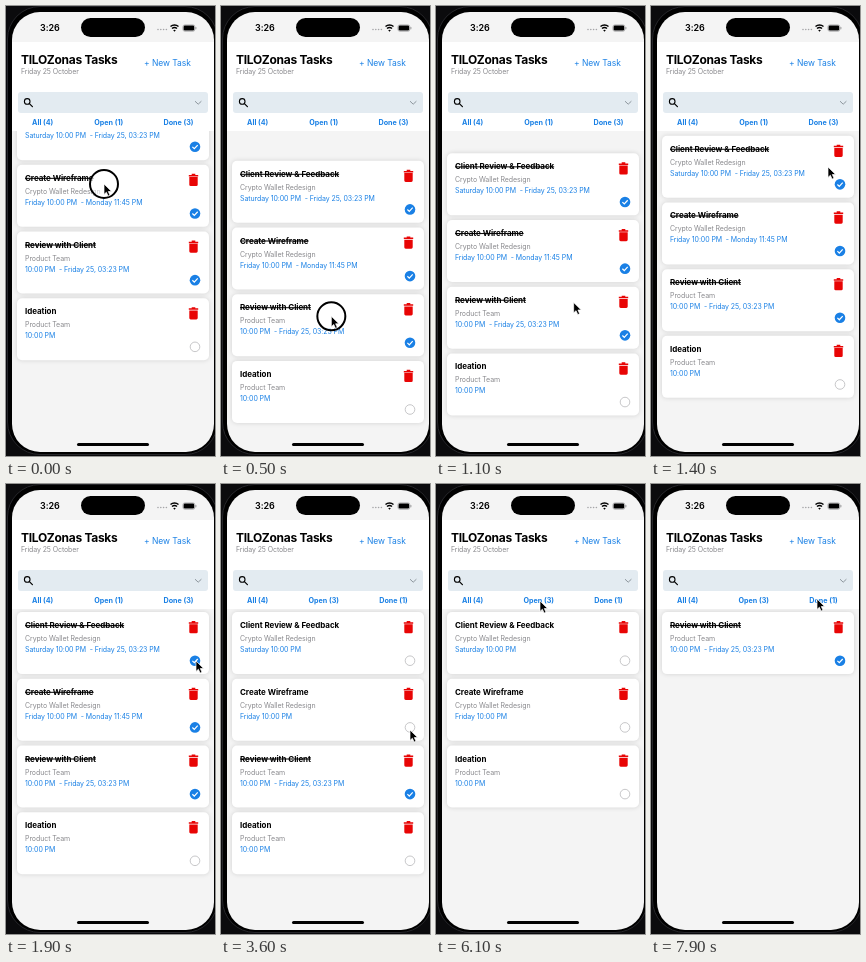
Write an HTML page that moves like this. It is 209 px wide and 450 px high and loops after 8 s.

```html
<!DOCTYPE html>
<html lang="en">
<head>
<meta charset="utf-8">
<title>Tasks</title>
<style>
  html, body { margin: 0; width: 100%; height: 100%; overflow: hidden; background: #0b0b0d; }
  #stage { position: relative; width: 209px; height: 450px; overflow: hidden; font-family: Inter, Roboto, sans-serif; }
  #stage div, #stage svg { position: absolute; }
  .body { left: 1px; top: 0; width: 211px; height: 449px; box-sizing: border-box; border: 1px solid #26262a; border-radius: 33px; background: #000; }
  .screen { left: 6px; top: 6px; width: 202px; height: 440px; border-radius: 28px; background: #f4f4f4; overflow: hidden; }
  .header { left: 6px; top: 36px; width: 202px; height: 89px; background: #fff; }
  .island { left: 75px; top: 12px; width: 64px; height: 19px; border-radius: 10px; background: #000; }
  .home { left: 71px; top: 437px; width: 72px; height: 2.5px; border-radius: 2px; background: #000; }
  .search { left: 12px; top: 86px; width: 190px; height: 21px; border-radius: 3px; background: #e3ebf1; }
  .text { height: 20px; line-height: 20px; white-space: pre; }
  .clock { left: 34px; top: 12px; font-size: 9px; font-weight: 600; letter-spacing: -.1px; }
  .name { left: 15px; top: 44px; font-size: 12px; font-weight: 700; letter-spacing: -.3px; }
  .day { left: 15px; top: 56px; font-size: 7px; letter-spacing: -.1px; color: #8a8a8e; }
  .new { left: 138px; top: 47px; font-size: 8.5px; letter-spacing: -.05px; color: #1a80e5; }
  .tab { top: 107px; width: 60px; text-align: center; font-size: 7.2px; font-weight: 700; color: #1a80e5; }
  #list { left: 6px; top: 125px; width: 202px; height: 302px; overflow: hidden; }
  .card { left: 5px; top: 0; width: 192px; height: 62px; border-radius: 5px; background: #fff; box-shadow: 0 0 5px rgba(0, 0, 0, .14); }
  .card .text { left: 8px; font-size: 7px; }
  .card .title { top: 3px; font-size: 8px; font-weight: 700; letter-spacing: -.05px; }
  .card .project { top: 17px; letter-spacing: -.08px; color: #8a8a8e; }
  .card .when { top: 28.4px; letter-spacing: -.08px; color: #1a80e5; }
  .done .title { text-decoration: line-through; text-decoration-thickness: 1px; }
  .card svg { left: 0; top: 0; }
  .tick, .card .end { display: none; }
  .done .tick, .done .end { display: inline; }
  .done .ring { display: none; }
  #pointer { left: 0; top: 0; overflow: visible; }
</style>
</head>
<body>
<div id="stage">
  <div class="body"></div>
  <div class="screen"></div>
  <div class="header"></div>
  <div class="island"></div>
  <div class="text clock">3:26</div>
  <div class="text name">TILOZonas Tasks</div>
  <div class="text day">Friday 25 October</div>
  <div class="text new">+ New Task</div>
  <div class="search"></div>
  <div class="text tab" style="left:6.7px"></div>
  <div class="text tab" style="left:72.7px"></div>
  <div class="text tab" style="left:142.5px"></div>
  <svg width="209" height="120" fill="none">
    <path d="M152 23.5h9" stroke="#a5a5a8" stroke-width="1.6" stroke-linecap="round" stroke-dasharray="0 2.8"/>
    <path d="M164.5 20.6a5.8 5.8 0 0 1 8 0M166 22.6a3.6 3.6 0 0 1 5 0" stroke="#000" stroke-width="1.4"/>
    <path d="M167.2 24.2a2 2 0 0 1 2.6 0l-1.3 1.6z" fill="#000"/>
    <rect x="176.9" y="18.9" width="12" height="6.4" rx="2" stroke="#9b9b9d" stroke-width=".7"/>
    <rect x="177.6" y="19.6" width="10.6" height="5" rx="1.4" fill="#000"/>
    <path d="M189.9 21v2.2" stroke="#9b9b9d"/>
    <circle cx="21.2" cy="95.4" r="2.8" stroke="#000" stroke-width="1.1"/>
    <path d="M23.4 97.6l3 3" stroke="#000" stroke-width="1.2" stroke-linecap="round"/>
    <path d="M189 95.2l3.2 3 3.2-3" stroke="#8d969d" stroke-width="1"/>
  </svg>
  <div id="list"></div>
  <div class="home"></div>
  <svg id="pointer" width="20" height="20">
    <circle r="14" fill="#fff" fill-opacity=".6" stroke="#000" stroke-width="2"/>
    <path d="M0 0v10.4l2.4-2.2 1.7 3.9 1.9-.8-1.7-3.8h3.3z" fill="#000" stroke="#fff" stroke-width=".7"/>
  </svg>
</div>
<script>
  const LOOP = 8000, PITCH = 66.7, TOP = 3.1, RELEASE = 900;

  // until: when the task stops being done
  const tasks = [
    { title: 'Client Review & Feedback', project: 'Crypto Wallet Redesign', start: 'Saturday 10:00 PM', end: 'Friday 25, 03:23 PM', until: 2400 },
    { title: 'Create Wireframe', project: 'Crypto Wallet Redesign', start: 'Friday 10:00 PM', end: 'Monday 11:45 PM', until: 3600 },
    { title: 'Review with Client', project: 'Product Team', start: '10:00 PM', end: 'Friday 25, 03:23 PM', until: LOOP },
    { title: 'Ideation', project: 'Product Team', start: '10:00 PM', end: '', until: 0 }
  ];

  // time, x, y of the pointer
  const path = [
    [0, 98, 178], [800, 116, 371], [900, 116, 371], [1400, 177, 161], [1900, 190, 177],
    [2500, 189, 178], [3400, 189, 246], [4200, 189, 246], [4900, 142, 109], [5100, 133, 116],
    [5600, 104, 117], [6400, 104, 117], [7000, 166, 116], [7800, 166, 116], [7900, 166, 115], [LOOP, 166, 115]
  ];
  const presses = [[0, RELEASE], [2300, 2400], [3500, 3600], [5900, 6000], [7500, 7600]];

  const list = document.getElementById('list');
  const pointer = document.getElementById('pointer');
  const ring = pointer.querySelector('circle');
  const tabs = document.querySelectorAll('.tab');

  const icons = `<svg width="192" height="62" fill="none">
    <path d="M171.8 10.1h9.4v1.5h-9.4zM174.7 8.9h3.6v1.3h-3.6zM172.3 12.2h8.4v7.6q0 1.4-1.4 1.4h-5.6q-1.4 0-1.4-1.4z" fill="#e80505"/>
    <circle class="ring" cx="178" cy="48.6" r="4.8" stroke="#b9b9bc" stroke-width=".8"/>
    <g class="tick"><circle cx="178" cy="48.6" r="5.3" fill="#1a80e5"/>
    <path d="M175.4 48.7l1.9 1.9 3.4-3.7" stroke="#fff" stroke-width="1.2"/></g></svg>`;

  function line(kind, text) {
    const el = document.createElement('div');
    el.className = 'text ' + kind;
    el.textContent = text;
    return el;
  }

  for (const task of tasks) {
    const card = document.createElement('div');
    card.className = 'card';
    card.innerHTML = icons;
    const when = line('when', task.start);
    const end = document.createElement('span');
    end.className = 'end';
    end.textContent = '  - ' + task.end;
    when.append(end);
    card.append(line('title', task.title), line('project', task.project), when);
    list.append(card);
    task.card = card;
  }

  function pointerAt(t) {
    const i = path.findIndex(p => p[0] > t);
    const [t0, x0, y0] = path[i - 1], [t1, x1, y1] = path[i];
    const u = (t - t0) / (t1 - t0), e = u * u * (3 - 2 * u);
    return [x0 + (x1 - x0) * e, y0 + (y1 - y0) * e];
  }

  // Rubber band while dragged past the ends, critically damped return after
  function rubber(d) {
    const size = 302;
    return Math.sign(d) * size * (1 - 1 / (Math.abs(d) * .53 / size + 1));
  }

  function scrollAt(t) {
    if (t < RELEASE) return rubber(pointerAt(t)[1] - 255);
    const k = (t - RELEASE) * .0105;
    return rubber(116) * (1 + k) * Math.exp(-k);
  }

  function render(t) {
    const [x, y] = pointerAt(t);
    pointer.style.transform = `translate(${x}px, ${y}px)`;
    ring.style.display = presses.some(([a, b]) => t >= a && t < b) ? '' : 'none';

    const filter = t < 6000 ? 'all' : t < 7600 ? 'open' : 'done';
    const offset = TOP + scrollAt(t);
    let slot = 0, done = 0;
    for (const { card, until } of tasks) {
      const isDone = t < until;
      const shown = filter === 'all' || (filter === 'done') === isDone;
      if (isDone) done++;
      card.classList.toggle('done', isDone);
      card.style.display = shown ? '' : 'none';
      if (shown) card.style.transform = `translateY(${offset + PITCH * slot++}px)`;
    }
    tabs[0].textContent = `All (${tasks.length})`;
    tabs[1].textContent = `Open (${tasks.length - done})`;
    tabs[2].textContent = `Done (${done})`;
  }

  function tick() {
    render(performance.now() % LOOP);
    requestAnimationFrame(tick);
  }
  tick();
</script>
</body>
</html>
```
